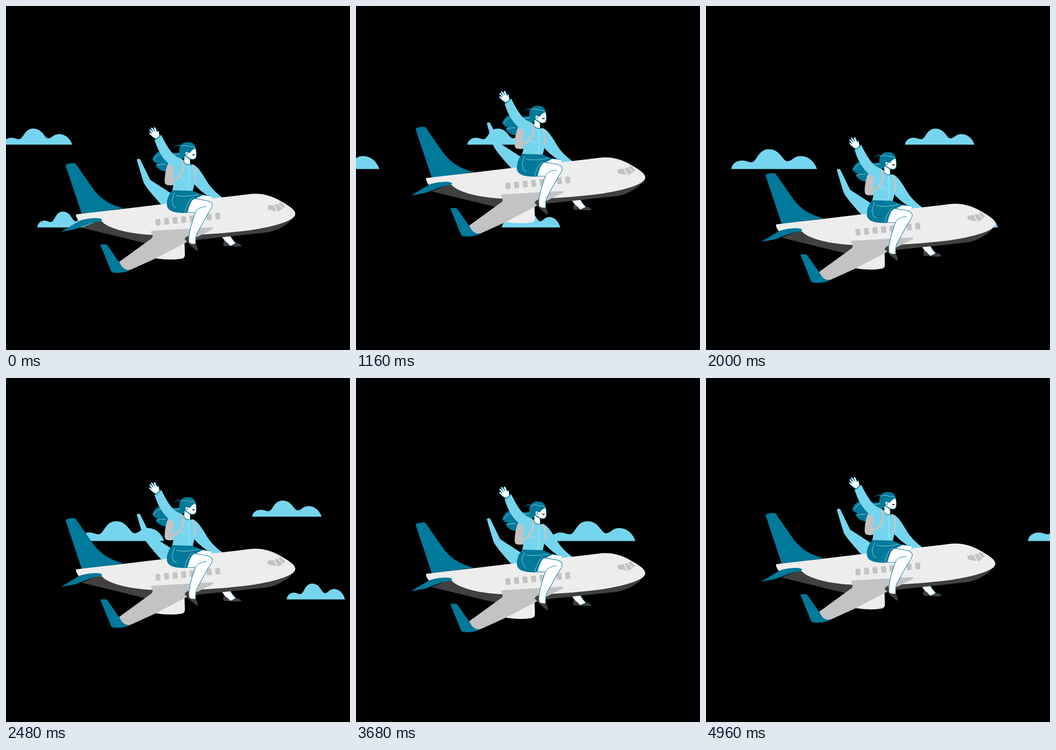
An HTML page for the animation above (5000 ms loop, 748x748 px).

```html
<!DOCTYPE html>
<html lang="en">
<head>
<meta charset="utf-8">
<title>Flying away</title>
<style>
  html, body { margin: 0; width: 100%; height: 100%; overflow: hidden; background: #000; }
  svg { display: block; width: 100vw; height: 100vh; }
  .teal { fill: #00799a; }
  .sky { fill: #76d5ee; }
  .grey { fill: #c3c3c3; }
  .hull { fill: #ededed; }
  .dark { fill: #404040; }
  .skin { fill: #fff; stroke: #00799a; stroke-width: 1.1; stroke-linejoin: round; }
  .line { fill: none; stroke: #c9eef8; stroke-width: .8; stroke-linecap: round; }
  .ink { fill: none; stroke: #00799a; stroke-width: 1; stroke-linecap: round; }
  .strap { fill: none; stroke: #c3c3c3; stroke-linecap: butt; }
</style>
</head>
<body>
<svg viewBox="0 0 748 748">
  <defs>
    <path id="cloud" d="M0 0C1 -10 10 -15.5 20 -15C28 -14.5 30 -11.5 36 -12C45 -13 47 -35 66 -35C87 -35 90 -14 99 -13.8C107 -13.5 110 -23 122 -23C136 -23 147 -13 151 0Z"/>
    <rect id="pane" x="-5.3" y="-7.2" width="10.6" height="14.4" rx="2" transform="rotate(-6)"/>
  </defs>
  <rect width="748" height="748"/>
  <g id="clouds" class="sky"></g>

  <g id="flyer">
    <path class="sky" d="M284.5 334.500C285 332 291 331.500 292 334L313.500 378L360 408L350 432L337 431C320 412 303 393 299 383Q292 361 284.500 334.500Z"/>
    <path class="teal" d="M130 348C129.500 344 133 343 146 341.500C150 341 151.500 343 153.500 346L189 397C206 420 225 432 256 440L165 453Z"/>

    <!-- far limbs, tucked behind the hull -->
    <path class="sky" d="M407 345C420 350 430 371 442 389C452 402 462 410 471 417L450 420C432 409 418 398 408 386Z"/>
    <path class="skin" d="M468 500L488 500Q492 508 500 516L488 522L478 514Z"/>
    <path class="dark" d="M474 510C472 514 472.500 519 473 521.500L484 522L497 523Q506 524 512 522Q511 517 500 515.500Q496 520 487 521.500Q482 514 474 510Z"/>

    <path class="dark" d="M164 482L208 464L400 490L629 452C628 462 603 485 570 492L415 508.500L330 518L304 516Z"/>
    <path class="hull" d="M152 455Q152 453 155 452.800L340 431L522 410C553 405 574 411 598 424.500C616 435 629 443 629 452C629 470 560 485 510 490C430 499 360 500 305 497C265 494 222 484 208 468L160 469C156 466 153 460 152 455Z"/>
    <path class="teal" d="M120 491L159 467.500C174 461.500 198 460 206 462.500C210 464 210 467 205 468C180 471 162 483 148 486Z"/>

    <g id="panes" class="grey"></g>
    <path class="grey" d="M568.500 434.500L582 432.500L588.500 446.500L571 443Q568 442 568.500 434.500ZM584 432L590 430L601.500 441L592 447.500ZM592 429.500L597.500 426L607.500 436L602.500 440Z"/>

    <path class="hull" d="M322 548L388 508L389 541Q389 548 382 549.500C360 553 340 551 322 548Z"/>
    <path class="grey" d="M315.500 491Q315 489 318 488.800L448 481.200Q453 481.500 449 485.500L390 515L325 549L271 573.500C258 578 250 566 246 556.500L317 505Q320 502 318 498Z"/>
    <path class="teal" d="M205.500 520Q205 518.500 208 518.300L216 518.200Q219 518 221 521L246 557C252 567 257 576 271 573.500C257 581 241 581 233 579.500Q229 578.500 227.500 574Z"/>

    <!-- hair behind -->
    <path class="teal" d="M386 316C372 321 357 321 346 314.500C334 312 321 322 318.500 334Q322 341 330 342.500Q326 344 326 347.500C332 356 340 360 350 360L378 332L390 331Z"/>
    <path class="line" d="M321 334C330 321 342 318 351 320M328 346Q338 343 347 344M366 323Q378 323 386 318"/>

    <!-- backpack and torso -->
    <path class="grey" d="M354 340C348 350 345 368 345 381Q345 389 352 389.500Q362 391 368 387L370 350Z"/>
    <path class="sky" d="M323 291L337.500 280C344 294 352 308 360 318Q368 328 382 332.500L388 338L400 345Q407 344 410 348C414 357 412 372 411 382Q408 394 406 403L361 402Q366 388 362 376Q366 360 364 350C345 339 332 320 323 291Z"/>
    <path class="strap" stroke-width="5" d="M384.500 336C388 355 380 374 363 379"/>
    <path class="strap" stroke-width="3.800" d="M405 345C412 356 413 368 410.500 382"/>
    <path class="line" d="M397 347C400 360 395 368 398 379Q399 392 395 400M379 371Q385 376 391 375"/>

    <!-- raised hand -->
    <path class="skin" d="M324.500 288.500C319 285 313 280 311 276Q312 273.500 317.500 277.500L311.500 270Q312 267 315 269L320 274L315 266Q316.500 262.500 319 266L323.500 272L321 265Q322.500 262 325 265L329 274Q330 270 332.500 273Q332 276 334 281Q332 287 324.500 288.500Z"/>
    <path class="ink" d="M324 291Q332 289 337 281"/>

    <!-- head -->
    <path class="skin" d="M388 325L387 340Q394 347 400.500 344.500L400 333Z"/>
    <path class="skin" d="M390 306L411 306C415 316 414.500 326 412.500 330.500Q409 335 401 332.500L391 326Q386 320 390 306Z"/>
    <path class="teal" d="M377 318C375 303 385 296 394 296C405 295 413 301 411.500 310L409.500 311Q404 313 400.500 319Q396 320 394 317Q390 316 389.500 322L386 328Q379 323 377 318Z"/>
    <path class="skin" stroke-width=".7" d="M394 317Q389 316 390 320Q391 325 395 323Z"/>
    <path class="dark" d="M404 322Q408 323.500 411 321.500Q409.500 326 407 325.500Q405 325 404 322Z"/>
    <path class="line" d="M379 305Q391 301 400 306Q407 304 410 309"/>
    <path class="ink" d="M365 307Q373 302 381 304M372 302Q380 302 388 306"/>
    <path class="ink" d="M387 340Q393 347 401 345"/>

    <!-- legs and skirt -->
    <path d="M412 418L422 410L444 413Q450 416 446 420L430 422Z" fill="#fff"/>
    <path class="ink" d="M420 410L444 413"/>
    <path class="teal" d="M362 400.500C352 411 349 424 350 434C352 446 366 450.500 392 450L397 447Q400 430 410 420L428 411L406 402Z"/>
    <path class="skin" d="M394 449C398 434 402 421 410 418.500L436 423C449 426 451 432 446 441C435 456 425 478 416 493Q411 503 412.500 519L398 517C396 500 402 475 412 449Z"/>
    <path class="ink" d="M412 448Q417 437 436 436"/>
    <path class="line" d="M366 406C365 415 358 422 363 429Q362 437 370 438M371 412Q390 416 418 410M389 448Q393 428 406 416"/>
    <path class="dark" d="M396.500 499.500Q389 503 388.500 507L400 520L416 533Q418 529 415 521L412.500 517Q404 519 398 514Z"/>
  </g>
</svg>
<script>
  const NS = "http://www.w3.org/2000/svg";
  const $ = id => document.getElementById(id);
  const LOOP = 5000, TICK = 40, FPS = 30, DRIFT = 7.328;

  function addUse(parent, ref) {
    const el = document.createElementNS(NS, "use");
    el.setAttribute("href", "#" + ref);
    return parent.appendChild(el);
  }

  for (let i = 0; i < 8; i++)
    addUse($("panes"), "pane")
      .setAttribute("transform", `translate(${330.5 + i * 18.57} ${470 - i * 1.86})`);

  // start x, base y, horizontal and vertical scale
  const clouds = [
    [-7, 301.5, 1, 1],
    [68, 481.6, 0.841, 0.99],
    [-384.5, 354.5, 1.232, 1.232]
  ].map(([x, y, sx, sy]) => ({ x, y, sx, sy, el: addUse($("clouds"), "cloud") }));

  // [step, vertical offset], straight lines between
  const bob = [[0, 0], [29, -100], [59, 26], [89, -100], [119, 3.7], [150, -51.8]];

  function height(step) {
    const i = bob.findIndex(([s]) => s > step);
    const [s0, y0] = bob[i - 1], [s1, y1] = bob[i];
    return y0 + (y1 - y0) * (step - s0) / (s1 - s0);
  }

  function draw(ms) {
    // motion runs on a 30 fps clock shown at 25 fps
    const tick = Math.floor((ms % LOOP) / TICK + 1e-4);
    const step = Math.floor(tick * TICK * FPS / 1000 + 1e-6);
    for (const c of clouds)
      c.el.setAttribute("transform",
        `translate(${c.x + DRIFT * step} ${c.y}) scale(${c.sx} ${c.sy})`);
    $("flyer").setAttribute("transform", `translate(0 ${height(step)})`);
  }

  const start = performance.now();
  function frame() {
    draw(performance.now() - start);
    requestAnimationFrame(frame);
  }
  draw(0);
  requestAnimationFrame(frame);
</script>
</body>
</html>
```
